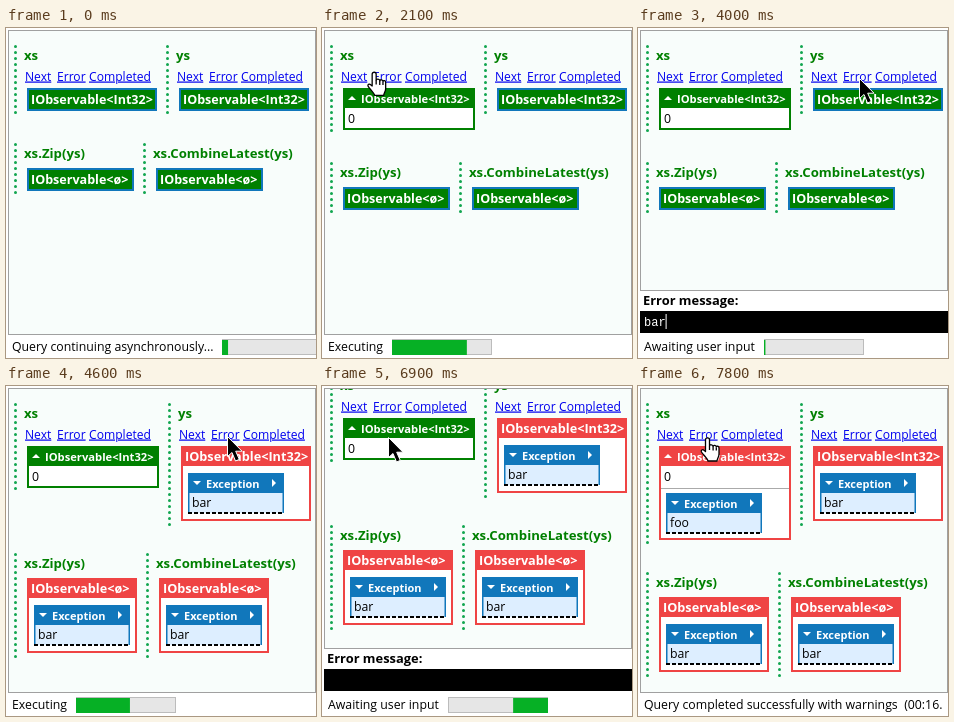
These frames come from a looping animation (310 px wide and 330 px high, 8 s). An HTML page:

```html
<!DOCTYPE html>
<html lang="en">
<head>
<meta charset="utf-8">
<style>
  html, body { margin: 0; width: 100%; height: 100%; overflow: hidden; background: #fff; }
  svg { display: block; width: 100vw; height: 100vh; }
  text { font-family: "Open Sans", "Noto Sans", sans-serif; white-space: pre; }
  .b { font-weight: 700; }
  .link { fill: #00e; text-decoration: underline; }
  .mono { font-family: "Liberation Mono", monospace; }
</style>
</head>
<body>
<svg id="stage" viewBox="0 0 310 330"></svg>
<script>
const LOOP = 8000, STEP = 100;
const GREEN = '#008000', RED = '#ef4444', BLUE = '#1177bb';
const stage = document.getElementById('stage');

const rect = (x, y, w, h, fill, extra = '') =>
  `<rect x="${x}" y="${y}" width="${w}" height="${h}" fill="${fill}" ${extra}/>`;
const esc = s => s.replace(/</g, '&lt;').replace(/>/g, '&gt;');
const text = (x, y, s, size, fill = '#000', cls = '') =>
  `<text x="${x}" y="${y}" font-size="${size}" fill="${fill}" class="${cls}">${esc(s)}</text>`;
const tri = points => `<polygon points="${points}" fill="#fff"/>`;

// Status bar phases: start time, label, bar position, marquee origin, prompt label
const phases = [
  [0, 'Query continuing asynchronously...', 216, -24],
  [900, 'Awaiting user input', 126, 888, 'Next value:'],
  [1900, 'Executing', 70, 1803],
  [3300, 'Awaiting user input', 126, 3288, 'Error message:'],
  [4400, 'Executing', 70, 4386],
  [6400, 'Awaiting user input', 126, 6332, 'Error message:'],
  [7700, 'Executing', 70, 7688],
  [7800, 'Query completed successfully with warnings  (00:16.', 0, 0]
];

// Pointer path: time, x, y
const path = [
  [100, 150, 330], [500, 60, 90], [700, 30, 28], [900, 28, 43], [2000, 28, 43],
  [2900, 178, 47], [3100, 217, 50], [5000, 217, 50], [5500, 140, 28],
  [5800, 60, 48], [6000, 62, 51], [8000, 62, 51]
];

function dots(x, y, end) {
  return `<line x1="${x + 1.5}" y1="${y + 1.5}" x2="${x + 1.5}" y2="${end - 1}" stroke="#12a650"
    stroke-width="3" stroke-linecap="round" stroke-dasharray="0 6"/>`;
}

function plainBox(x, y, w, type) {
  return rect(x + 1, y + 1, w - 2, 21, GREEN, `stroke="${BLUE}" stroke-width="2"`) +
    text(x + 4, y + 16, `IObservable<${type}>`, 12.55, '#fff', 'b');
}

function exception(x, y, msg) {
  return rect(x, y, 96, 40, BLUE) + rect(x + 1.5, y + 20, 93, 20, '#def') +
    tri(`${x + 5},${y + 8} ${x + 13},${y + 8} ${x + 9},${y + 12}`) +
    text(x + 18, y + 14.5, 'Exception', 11, '#fff', 'b') +
    tri(`${x + 84},${y + 6} ${x + 88},${y + 10} ${x + 84},${y + 14}`) +
    text(x + 4, y + 33.5, msg, 12.3) +
    `<path d="M${x} ${y + 40}h96" stroke="#000" stroke-width="2" stroke-dasharray="4 2"/>`;
}

function table(x, y, w, type, value, msg) {
  const color = msg ? RED : GREEN, h = !msg ? 42 : value ? 94 : 75;
  let s = rect(x + 1, y + 1, w - 2, h - 2, '#fff', `stroke="${color}" stroke-width="2"`) +
    rect(x, y, w, 20, color);
  if (value) {
    s += tri(`${x + 5},${y + 12} ${x + 13},${y + 12} ${x + 9},${y + 8}`) +
      text(x + 18, y + 14.5, `IObservable<${type}>`, 11.2, '#fff', 'b') +
      text(x + 5, y + 35, value, 12.3);
    if (msg) s += rect(x + 2, y + 42, w - 4, 1, '#aaa');
  } else {
    s += text(x + 4, y + 15, `IObservable<${type}>`, 12.7, '#fff', 'b');
  }
  return msg ? s + exception(x + 7, y + (value ? 47 : 27), msg) : s;
}

// One labelled column; returns its markup and the bottom of its box
function column(x, y, title, { type, links, value, msg }) {
  const top = y + (links ? 43 : 25), big = type === 'Int32';
  const plain = !value && !msg;
  const bottom = top + (plain ? 23 : !msg ? 42 : value ? 94 : 75);
  let s = dots(x, y, bottom + 5) + text(x + 10, y + 15, title, 13.2, GREEN, 'b');
  if (links) ['Next', 'Error', 'Completed'].forEach((l, i) => {
    s += text(x + 11 + 32 * i, y + 35.5, l, 12.1, '#00e', 'link');
  });
  s += plain ? plainBox(x + 13, top, big ? 130 : 107, type)
    : table(x + 13, top, big ? (value ? 132 : 130) : 110, type, value, msg);
  return [s, bottom];
}

function content(t) {
  const value = t >= 1900 && '0', bar = t >= 4400 && 'bar', foo = t >= 7700 && 'foo';
  const [xs, end1] = column(8, 17, 'xs', { type: 'Int32', links: true, value, msg: foo });
  const [ys, end2] = column(value ? 162 : 160, 17, 'ys', { type: 'Int32', links: true, msg: bar });
  const y = Math.max(end1, end2) + 32, cell = { type: 'ø', msg: bar };
  return xs + ys + column(8, y, 'xs.Zip(ys)', cell)[0] +
    column(bar ? 140 : 137, y, 'xs.CombineLatest(ys)', cell)[0];
}

function prompt(t, label) {
  const typed = t < 3300 ? '0' : t < 6000
    ? 'bar'.slice(0, Math.max(0, Math.floor((t - 3400) / 200)))
    : 'foo'.slice(0, Math.max(0, Math.floor((t - 6800) / 200)));
  const selected = t < 1300;
  let s = text(5, 277, label, 12.9, '#000', 'b') + rect(2, 283, 308, 22, '#000');
  if (selected) s += rect(6, 286, 8, 15, '#2a7fe0');
  s += text(6, 298, typed, 12, '#fff', 'mono');
  if (!selected && t % 1000 < 500) s += rect(6 + 7.2 * typed.length, 286, 1, 15, '#fff');
  return s;
}

function status(t, [, label, x, origin]) {
  let s = text(6, 323, label, 12.3);
  if (!x) return s;
  const chunk = 78, lead = (t - origin) * 0.252 % (100 + chunk);
  const from = Math.max(0, lead - chunk), to = Math.min(100, lead);
  return s + rect(x + .5, 311.5, 99, 15, '#e6e6e6', 'stroke="#bcbcbc"') +
    rect(x + from, 312, to - from, 15, '#06b025');
}

function pointer(t) {
  if (t < path[0][0]) return '';
  const i = path.findIndex(p => p[0] > t);
  const [t0, x0, y0] = path[i - 1], [t1, x1, y1] = path[i];
  const k = (t - t0) / (t1 - t0), x = x0 + (x1 - x0) * k, y = y0 + (y1 - y0) * k;
  const tip = x + 7 - (x > 150 ? 154 : 0);
  const onLink = y > 40 && y < 56 &&
    [[19, 46], [51, 78], [83, 146]].some(([a, b]) => tip >= a && tip <= b);
  const idle = t >= 3400 && t < 5100 || t >= 6900 && t < 7700;
  return onLink && !idle
    ? `<g transform="translate(${x} ${y})" fill="#fff" stroke="#000" stroke-width="1.3" stroke-linejoin="round">
       <path d="M5.5 14.5V2.8a2 2 0 0 1 4 0V9c0-1.8 3.6-1.6 3.6.4c.3-1.6 3.2-1.4 3.2.6c.4-1.3 2.7-1 2.7.9V17c0 3-1.5 4-2 7H8c-.5-2.5-4.5-6-6.5-9c-1-1.8 1-3.2 2.5-1.7z"/>
       <path d="M9.5 9v4M13.1 9.5v4M16.3 10.5v3" fill="none"/></g>`
    : `<path transform="translate(${x + 4} ${y})" fill="#000" stroke="#fff"
       d="M.5.5V20.5L5 16.5L8.5 25L12.3 23.4L8.7 15.2H15z"/>`;
}

function draw(t) {
  const phase = phases.findLast(p => t >= p[0]), label = phase[4];
  const bottom = label ? 262 : 306, scroll = label && t > 6000 ? -28 : 0;
  return rect(2, 2, 308, 304, '#f8fdfb') +
    `<g transform="translate(0 ${scroll})">${content(t)}</g>` +
    rect(0, 0, 310, 2, '#fff') + rect(0, bottom, 310, 330 - bottom, '#fff') +
    rect(2.5, 2.5, 307, bottom - 2, 'none', 'stroke="#a0a0a0"') +
    (label ? prompt(t, label) : '') + status(t, phase) + pointer(t);
}

let shown = -1;
function tick() {
  const t = Math.floor(performance.now() % LOOP / STEP) * STEP;
  if (t !== shown) stage.innerHTML = draw(shown = t);
  requestAnimationFrame(tick);
}
tick();
</script>
</body>
</html>
```
